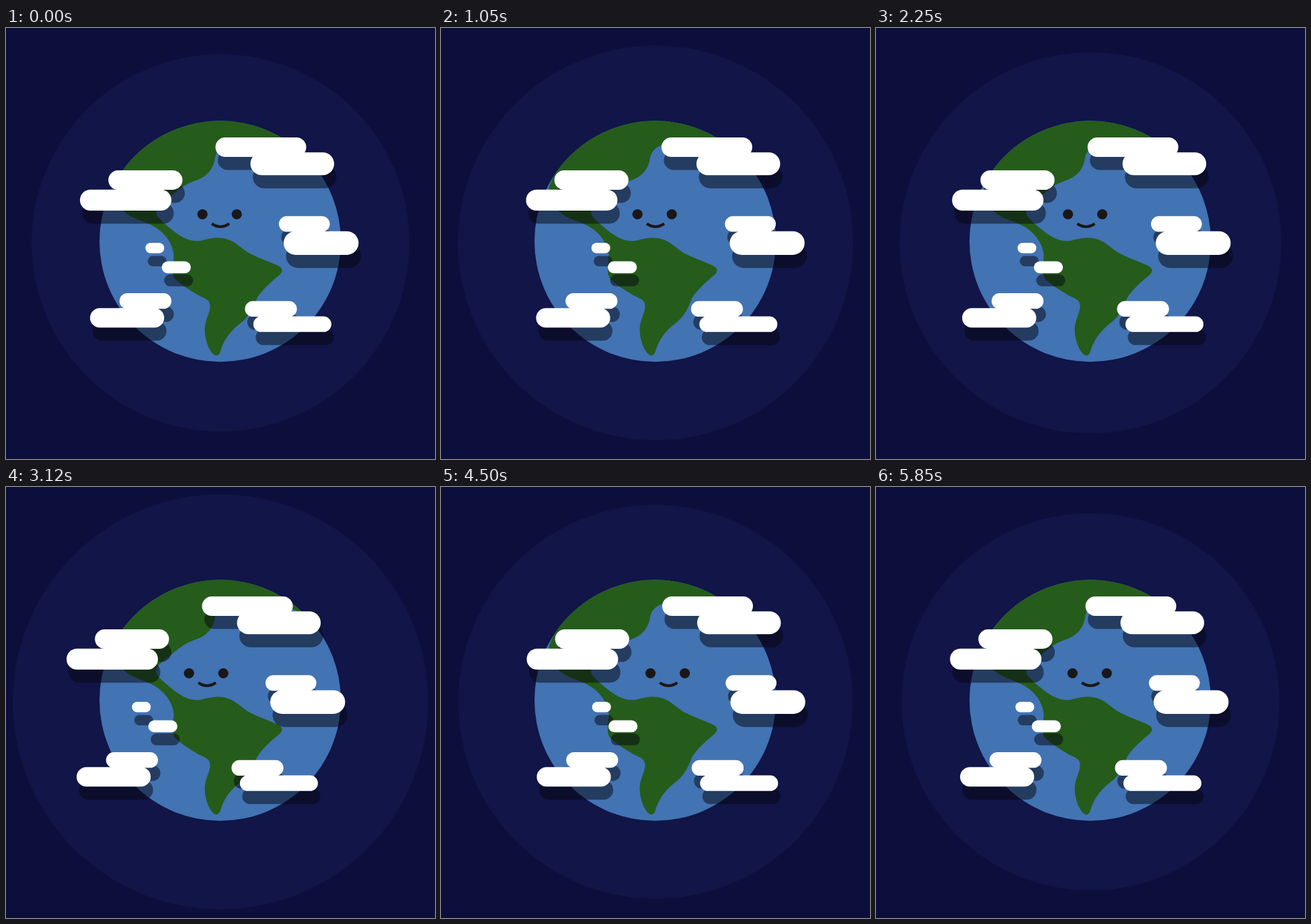
An HTML page for the animation above (5.88 s loop, 638 by 642 pixels).

```html
<!DOCTYPE html>
<html lang="en">
<head>
<meta charset="utf-8">
<title>Smiling Earth</title>
<style>
  html, body { margin: 0; width: 100%; height: 100%; overflow: hidden; background: #0c0f3b; }
  svg { display: block; width: 100%; height: 100%; }
</style>
</head>
<body>
<svg viewBox="0 0 638 642">
  <defs>
    <clipPath id="disc"><circle cx="318.5" cy="317.8" r="179.5"/></clipPath>
    <!-- puffs are round-capped strokes, grouped by thickness -->
    <g id="puffs" fill="none" stroke-linecap="round">
      <path stroke-width="15.400" d="M215 327.700H227.600"/>
      <path stroke-width="17.700" d="M240.500 356.400H266"/>
      <path stroke-width="23.300" d="M417.500 291.900H469.900M180.400 406.700H234.400M367 418.400H421M379.500 441.200H472.200"/>
      <path stroke-width="29" d="M326 177.500H432M166.700 226.500H247.900M139.500 431.800H220.700"/>
      <path stroke-width="31.300" d="M125.700 256.400H230.300"/>
      <path stroke-width="34" d="M380.500 202.200H471"/>
      <path stroke-width="35.300" d="M430.600 320.300H506.700"/>
    </g>
  </defs>
  <circle id="halo" cx="319" cy="320" r="281" fill="#111547"/>
  <circle cx="318.5" cy="317.8" r="179.5" fill="#4273b3"/>
  <path clip-path="url(#disc)" fill="#255c1b" d="M174 272
    C164 262 158 250 161 236 Q164 228 172 212 L150 120 H450 L442 189
    C420 176 370 170 328 174.500 C319 178 313 184 311 193
    C309 210 299 222 280 228 C262 234 250 247 238 256 C226 265 220 271 225 280
    C230 287 238 293 245 299 C258 310 272 319 289 317
    C302 314 311 311 325 313.500 C344 318 348 329 366 337.500
    C380 344.500 393 348.500 403.500 353.500 C412 357.500 412.500 362 406.500 368
    C396 377 381 389 373 403 C368 416 364 426 352 437
    C335 450 326 461 320 478 C317.500 488 314 490 308.500 486
    C301 479 295.500 463 295.500 449 C296 434 302 428 303.500 416
    C304 405 298 404 285 397.500 C272 389.500 259 382 251 373
    C245 362 249.500 350 249.500 338 C247.500 320 236 304 217 294
    C201 286 185 283 174 272Z"/>
  <g id="face" fill="#1a1718">
    <circle cx="292.2" cy="277.5" r="7.6"/>
    <circle cx="343.2" cy="277.5" r="7.6"/>
    <path d="M306 291.500Q319 300.500 332 291.500" fill="none" stroke="#1a1718" stroke-width="4"/>
  </g>
  <g id="clouds">
    <g opacity=".5"><use href="#puffs" x="3.500" y="19.500" stroke="#070710"/></g>
    <use href="#puffs" stroke="#fff"/>
  </g>
</svg>
<script>
const LOOP = 5880;
const $ = id => document.getElementById(id);
const ease = u => u * u * (3 - 2 * u);

// Eases from key to key, then back to the first one; each key is [time, value].
function track(...keys) {
  keys.push([LOOP, keys[0][1]]);
  return time => {
    const i = keys.findIndex(key => key[0] > time);
    const [t0, v0] = keys[i - 1], [t1, v1] = keys[i];
    return v0 + (v1 - v0) * ease((time - t0) / (t1 - t0));
  };
}

const SWAY = 20;
const REST = 281;
const cloudX = track([0, 0], [1440, SWAY], [1530, SWAY], [3140, -SWAY], [4750, SWAY]);
const faceX = track([0, 0], [1700, 0], [3120, -SWAY], [4610, SWAY]);
const haloR = track([0, REST], [1050, 294], [2030, REST], [3120, 309], [4070, REST], [4560, 294]);

const slide = (id, x) => $(id).setAttribute('transform', `translate(${x.toFixed(2)} 0)`);

function draw(time) {
  slide('clouds', cloudX(time));
  slide('face', faceX(time));
  $('halo').setAttribute('r', haloR(time).toFixed(2));
}

const start = performance.now();
function tick() {
  draw((performance.now() - start) % LOOP);
  requestAnimationFrame(tick);
}
tick();
</script>
</body>
</html>
```
